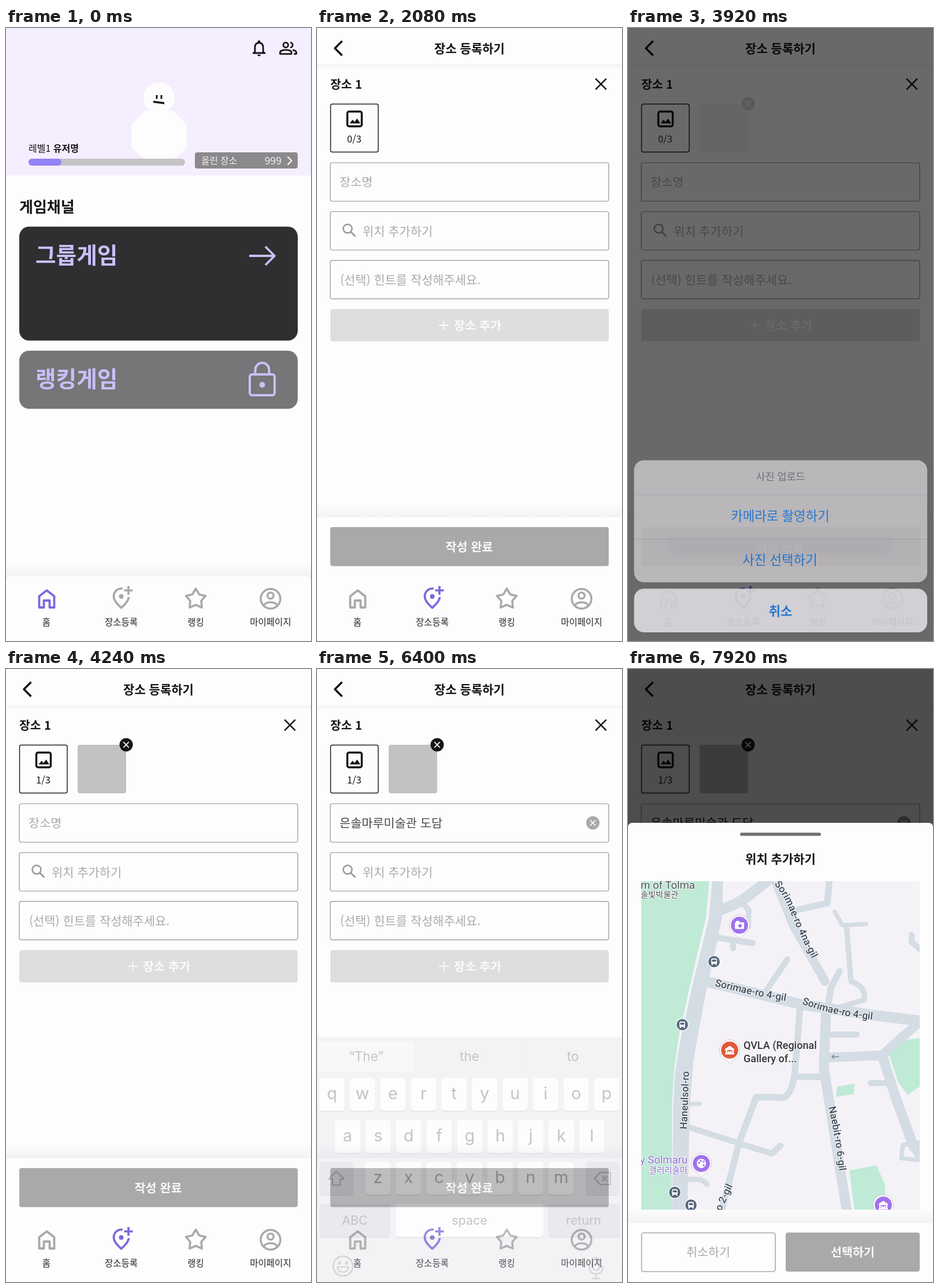
Recreate the animation shown at these times as an HTML page. Size 528 px wide and 1060 px high, loop 8000 ms.

```html
<!DOCTYPE html>
<html lang="ko">
<head>
<meta charset="utf-8">
<title>장소 등록</title>
<style>
html, body { margin: 0; width: 100%; height: 100%; overflow: hidden; background: #fdfdfd; }
svg { display: block; width: 528px; height: 1060px; }
text { font-family: "Noto Sans CJK KR", "Noto Sans KR", "Noto Sans CJK", "Noto Sans", sans-serif; white-space: pre; }
.kb text { font-family: Inter, Roboto, sans-serif; }
.map text { font-family: Roboto, "Noto Sans CJK KR", "Noto Sans CJK", sans-serif; paint-order: stroke; stroke: #fafafa; stroke-width: 2px; stroke-linejoin: round; }
</style>
</head>
<body>
<svg id="stage" viewBox="0 0 528 1060" xmlns="http://www.w3.org/2000/svg"></svg>
<script>
const INK = '#151417', PAPER = '#fdfdfd', GRAY = '#a9a8aa', VIOLET = '#7b68dc', LILAC = '#c9bff8', BLUE = '#1f7ae6';

// y is the optical middle of the line
const text = (s, x, y, size, fill = INK, weight = 400, anchor = 'start') =>
  `<text x="${x}" y="${y + size * 0.375}" font-size="${size}" fill="${fill}" font-weight="${weight}" text-anchor="${anchor}">${s}</text>`;
const mid = (s, x, y, size, fill, weight) => text(s, x, y, size, fill, weight, 'middle');
const box = (x, y, x2, y2, r, fill, extra = '') =>
  `<rect x="${x}" y="${y}" width="${x2 - x}" height="${y2 - y}" rx="${r}" fill="${fill}" ${extra}/>`;
const line = (d, color, width, extra = '') =>
  `<path d="${d}" fill="none" stroke="${color}" stroke-width="${width}" stroke-linejoin="round" ${extra}/>`;
const dot = (x, y, r, fill, extra = '') => `<circle cx="${x}" cy="${y}" r="${r}" fill="${fill}" ${extra}/>`;
const ring = (x, y, r, color, width) => dot(x, y, r, 'none', `stroke="${color}" stroke-width="${width}"`);
const shape = (d, fill) => `<path d="${d}" fill="${fill}"/>`;
const cross = (x, y, h, color, width) =>
  line(`M${x - h} ${y - h}l${2 * h} ${2 * h}M${x + h} ${y - h}l${-2 * h} ${2 * h}`, color, width);
const layer = (id, body, cls = '') => `<g id="${id}" class="${cls}">${body}</g>`;
const badge = (x, y, fill) => dot(x, y, 11.5, fill) + cross(x, y, 4.8, '#f4f4f4', 1.8);

function star(cx, cy, R, r) {
  const pts = [];
  for (let i = 0; i < 10; i++) {
    const a = -Math.PI / 2 + i * Math.PI / 5, q = i % 2 ? r : R;
    pts.push((cx + q * Math.cos(a)).toFixed(1) + ' ' + (cy + q * Math.sin(a)).toFixed(1));
  }
  return 'M' + pts.join('L') + 'Z';
}

function nav(active) {
  const tint = i => i === active ? VIOLET : GRAY;
  const label = (s, x) => mid(s, x, 1027, 15.5, '#242326');
  return line('M57.5 982.5L70.5 972.5L83.5 982.5V1002H75.5V990H65.5V1002H57.5Z', tint(0), 3.8) +
    line('M202 969.5C194 968 186.5 974 186.5 983C186.5 990 192 996 199.5 1002.5C207 996 212.5 990 212.5 984', tint(1), 3.7) +
    dot(199.5, 983, 4, tint(1)) + line('M212 965v15M204.5 972.5h15', tint(1), 3.7) +
    line(star(328.5, 987.5, 18, 10), tint(2), 3.6) +
    ring(458, 987, 17, tint(3), 3.5) + ring(458, 981.5, 5.3, tint(3), 3.5) +
    line('M446 999Q449 993 458 993T470 999', tint(3), 3.5) +
    label('홈', 70) + label('장소등록', 199.5) + label('랭킹', 328.5) + label('마이페이지', 458);
}

const footer = (y, r) => box(0, y - 24, 528, y + 8, 0, 'url(#up)') + box(0, y, 528, 1080, r, PAPER);

const home = box(0, 0, 528, 1060, 0, PAPER) + box(0, 0, 528, 255, 0, '#f4eeff') +
  `<g transform="translate(421 17.7) scale(1.42)">${shape('M12 22c1.1 0 2-.9 2-2h-4c0 1.1.9 2 2 2zm6-6v-5c0-3.07-1.63-5.64-4.5-6.32V4c0-.83-.67-1.5-1.5-1.5s-1.5.67-1.5 1.5v.68C7.64 5.36 6 7.92 6 11v5l-2 2v1h16v-1l-2-2zm-2 1H8v-6c0-2.48 1.51-4.5 4-4.5s4 2.02 4 4.5v6z', INK)}</g>` +
  `<g transform="translate(471.7 18.2) scale(1.4)">${ring(9, 8, 3, INK, 2) +
    line('M2 19v-2c0-2 4-3 7-3s7 1 7 3v2zM14.5 5a3 3 0 0 1 0 6M17.5 14c2.5.6 4.5 1.5 4.5 3v2h-3', INK, 2)}</g>` +
  dot(265, 121, 27, PAPER) +
  shape('M241 143H289L301 155L313 168V206L300 219L289 226H241L230 219L217 206V168L229 155Z', PAPER) +
  line('M261 116v6.5M269 116v6.5', INK, 3) + line('M255 127.5L274 130', INK, 3.6) +
  text('레벨1 <tspan font-weight="700">유저명</tspan>', 39, 208, 16, INK, 500) +
  box(39, 226, 310, 238, 6, '#c4c3c5') + box(39, 226, 96, 238, 6, '#9183f6') +
  box(327, 215, 505, 243, 4, '#8b898c') + text('올린 장소', 338, 229, 15.7, '#f1f0f2', 300) +
  text('999', 477, 229.5, 17.5, '#f1f0f2', 300, 'end') + line('M487.5 222.5L494.5 229.5L487.5 236.5', '#fff', 2.2) +
  text('게임채널', 23, 309.5, 26, INK, 700) +
  box(23, 343.5, 505, 540.5, 17, '#2f2f31') + text('그룹게임', 51, 392, 38.7, LILAC, 700) +
  line('M421 394H464M449 378L465 394L449 410', LILAC, 3.8, 'stroke-linejoin="miter"') +
  box(23, 558, 505, 658.5, 17, '#767577') + text('랭킹게임', 51, 606, 38.7, LILAC, 700) +
  box(422, 599, 465, 635, 4, 'none', `stroke="${LILAC}" stroke-width="4"`) +
  line('M431.5 599V591A12 12 0 0 1 455.5 591V599', LILAC, 4) + dot(443.5, 617, 5, LILAC) +
  footer(948, 8) + nav(0);

const field = y => box(23, y, 505, y + 66.5, 3.5, PAPER, 'stroke="#929194" stroke-width="1.2"');
const HINT = '#aaa9ac';
const register = box(0, 0, 528, 1060, 0, PAPER) + box(0, 63, 528, 71, 0, 'url(#down)') +
  line('M43.5 22.5L31 35L43.5 47.5', INK, 3.6) +
  mid('장소 등록하기', 264, 35.5, 21, INK, 700) +
  text('장소 1', 23, 97.5, 20.3, INK, 700) + cross(491.5, 97, 9.3, INK, 2.5) +
  box(23.5, 131.5, 106, 214.5, 3, PAPER, 'stroke="#222" stroke-width="1.5"') +
  box(52.5, 144.5, 77.5, 170, 3, 'none', `stroke="${INK}" stroke-width="3.5"`) +
  shape('M56.5 165l5-6.5 3.5 4 4.5-6 5.5 8.5z', INK) +
  layer('zero', mid('0/3', 64.5, 192, 16.5, INK)) + layer('one', mid('1/3', 64.5, 192, 16.5, INK)) +
  layer('photo', box(124, 131, 208, 215, 4, '#c3c2c3') + badge(208, 131, INK)) +
  field(233) + layer('empty', text('장소명', 39, 266, 20.8, HINT, 350)) +
  layer('typed', text('은솔마루미술관 도담', 39, 266, 20.8, INK, 400) + badge(477.5, 266, '#8f8e91')) +
  field(317.5) + ring(53, 347, 7.5, '#99989b', 2.5) + line('M58.5 352.5L66.5 360.5', '#99989b', 2.8) +
  text('위치 추가하기', 79, 351, 20.9, HINT, 350) +
  field(401.8) + text('(선택) 힌트를 작성해주세요.', 40, 435, 20.9, HINT, 350) +
  box(23, 486, 505, 542, 4, '#e0dde1') + line('M211 514h17M219.5 505.5v17', '#fbfafb', 2) +
  text('장소 추가', 237, 514, 20.8, '#fbfafb', 700) +
  footer(846, 0) + box(23, 863, 505, 930.5, 4, GRAY) + mid('작성 완료', 263.5, 897, 20.7, '#fafafa', 700) + nav(1);

const actions = box(10.5, 747.5, 518, 958.5, 17, '#c9c7ca') +
  box(65, 882, 463, 908, 13, '#606070', 'opacity=".07" filter="url(#soft)"') +
  line('M11 807H518M11 884H518', '#b0aeb2', 1) +
  mid('사진 업로드', 264, 775, 17.4, '#737175', 500) +
  mid('카메라로 촬영하기', 263.5, 844, 22.3, BLUE) + mid('사진 선택하기', 263, 920, 22.3, BLUE) +
  box(10.5, 969.5, 518, 1045, 17, '#e7e5e9') + mid('취소', 264, 1008, 22, BLUE, 700);

function keyboard() {
  const key = (x, x2, y, fill = '#fdfdfd') => box(x, y + 2, x2, y + 58.5, 6, '#8b8d92') + box(x, y, x2, y + 57, 6, fill);
  const label = (s, x, y, size) => `<text x="${x}" y="${y}" font-size="${size}" fill="${INK}" text-anchor="middle">${s}</text>`;
  const row = (s, x, y) => [...s].map((c, i) => {
    const cx = x + i * 52.85;
    return key(cx - 22, cx + 22, y) + label(c, cx, y + 36.5, 29);
  }).join('');
  const DARK = '#abb1bf', ICON = '#55575d';
  return box(0, 636, 528, 1060, 0, '#d3d6de') + box(2, 644, 168, 696, 5, '#ecebf1') +
    label('“The”', 85, 678, 22.5) + label('the', 264, 678, 22.5) + label('to', 443, 678, 22.5) +
    line('M354 653V688', '#b6bac3', 1.2) +
    row('qwertyuiop', 25.8, 707) + row('asdfghjkl', 53, 780) + row('zxcvbnm', 105.5, 852) +
    key(4, 63, 852, DARK) + line('M33.5 868.5L47 882H40V892.5H27V882H20Z', INK, 2) +
    key(465, 523.5, 852, DARK) + line('M480.5 881L490 870.5H508V891.5H490Z', INK, 2) + cross(498, 881, 4.5, INK, 2) +
    key(4, 127, 925, DARK) + key(136.5, 392, 925) + key(400.5, 524, 925, DARK) +
    label('ABC', 65.5, 960.5, 21.5) + label('space', 264, 960.5, 21.5) + label('return', 461.5, 960.5, 21.5) +
    ring(45, 1032.5, 17, ICON, 2.5) + dot(39, 1027, 2.6, ICON) + dot(51, 1027, 2.6, ICON) +
    line('M35 1034H55C54 1040 50 1043 45 1043S36 1040 35 1034Z', ICON, 2.2) +
    box(477.5, 1018, 488.5, 1040, 5.5, 'none', `stroke="${ICON}" stroke-width="2.3"`) +
    line('M471.5 1032v3c0 15 23 15 23 0v-3M483 1046v8M476 1054h14', ICON, 2.3);
}

function map() {
  const GREEN = '#bfead6', ROAD = '#d4dde4', LABEL = '#3f4a5b', PURPLE = '#9f72ea', PLUM = '#8a6fd0';
  const roads = [
    [17, 'M152 419Q190 408 215 387L252 358'],
    [8, 'M196 402L209 417L208 446'], [9, 'M157 465L216 474M182 472v11'],
    [14, 'M252 358L286 443L341 540'], [10, 'M295 416L345 405L349 360M366 523L351 552L346 585'],
    [9, 'M276 502L240 555M348 632H396M420 716H445M505 484L491 472V460'],
    [6, 'M358 420L371 443L412 441M108 752H124M505 819L476 823L473 846L505 849'],
    [8, 'M378 443L386 540Q413 550 409 572L345 592M103 883Q130 880 137 891'],
    [17, 'M130 539L230 563L300 580L420 598L510 609'],
    [15, 'M440 668Q470 640 510 606M344 672L440 668'],
    [10, 'M298 585L289 695Q284 738 268 741L222 740L192 820L160 945M289 705H336'],
    [16, 'M343 588L339 690L380 945M440 668L463 740L494 825L512 848'],
    [9, 'M107 793L249 838L264 824']
  ];
  const pave = (grow, color) => roads.map(([w, d]) => line(d, color, w + grow, 'stroke-linecap="round"')).join('');
  const along = (id, d, s) => `<path id="${id}" d="${d}" fill="none"/><text font-size="17.5" fill="${LABEL}" font-weight="500"><textPath href="#${id}">${s}</textPath></text>`;
  const avenue = 'M147 360L141 430L113 545L92 640L82 700L79 760L77 945H102L106 760L112 680L119 640L134 560L147 500L162 430L164 360Z';
  const pin = (x, y, color, icon) =>
    `<path d="M${x - 12.5} ${y + 12}A17.5 17.5 0 1 1 ${x + 12.5} ${y + 12}L${x} ${y + 23}Z" fill="#fff" stroke="#c9c6cf"/>` +
    dot(x, y, 14.8, color) + `<g transform="translate(${x} ${y})">${icon}</g>`;
  const museum = shape('M-8 -2L0 -7.5L8 -2V0H-8ZM-7 0h2.5v6h-2.5zM4.5 0h2.5v6h-2.5zM-8 5H8V7.5H-8zM-3.5 5V1L0 3L3.5 1V5Z', '#fff');
  const camera = box(-8, -5, 8, 6.5, 1.5, '#fff') + box(-6, -7.5, 0, -4, 1, '#fff') + dot(1, 1, 3, PURPLE);
  const palette = dot(0, 0, 8, '#fff') + [[-4, -1], [-1, -4.5], [4, -3], [4, 3]].map(p => dot(p[0], p[1], 1.7, PURPLE)).join('');
  const stop = (x, y) => dot(x, y, 11, '#fff') + dot(x, y, 9.8, '#56677d') + box(x - 5, y - 5.5, x + 5, y + 4, 2, '#fff') +
    box(x - 3.5, y - 3.5, x + 3.5, y, 0.5, '#56677d') + line(`M${x - 3.5} ${y + 4}v2M${x + 3.5} ${y + 4}v2`, '#fff', 2);
  return box(23, 367, 505, 935, 0, '#f5f2f7') +
    shape('M23 367H141L135 430L109 540L88 635L79 700L76 760V935H23Z', GREEN) +
    shape('M450 660L480 642L505 638V722L484 736L468 716ZM362 722L392 717L391 735L360 740ZM383 867L430 858L445 892V935H392Z', GREEN) +
    line(avenue, '#c8d3dc', 1.2) + pave(1, '#c8d3dc') + shape(avenue, ROAD) + pave(0, ROAD) +
    stop(149, 506) + stop(94, 615) + stop(81, 905) + stop(109, 927) +
    line('M353 670.5h12M357 667l-4 3.5 4 3.5', '#7c8792', 1.6) +
    text('m of Tolma', 22, 373.5, 18.6, '#4c5156') + text('솔빛박물관', 22, 390, 14.2, '#4c5156') +
    along('r1', 'M253 372Q270 392 281 420Q300 468 330 522', 'Sorimae-ro 4na-gil') +
    along('r2', 'M150 548Q215 565 300 579', 'Sorimae-ro 4-gil') +
    along('r3', 'M301 579Q360 602 450 609', 'Sorimae-ro 4-gil') +
    along('r4', 'M102 796L107 660', 'Haneulsol-ro') +
    along('r5', 'M347 758Q360 810 368 890', 'Naebit-ro 6-gil') +
    along('r6', 'M161 938L190 875', 'o 2-gil') +
    text('QVLA (Regional', 200, 650.5, 18, '#33363b', 500) + text('Gallery of...', 200, 673, 18, '#33363b', 500) +
    text('y Solmaru', 103, 848.5, 18.5, PLUM, 400, 'end') + text('갤러리솔마', 103, 867, 14.5, PLUM, 400, 'end') +
    pin(193, 443, PURPLE, camera) + pin(176, 659, '#e2573b', museum) + pin(127, 855, PURPLE, palette) + pin(442, 927, PURPLE, museum);
}

const sheet = shape('M0 1060V274Q0 266 8 266H520Q528 266 528 274V1060Z', PAPER) +
  box(194, 283, 334, 288.5, 2.5, '#737175') + mid('위치 추가하기', 264, 328, 21, INK, 700) +
  `<g clip-path="url(#frame)" class="map">${map()}</g>` +
  footer(958, 0) + box(23.5, 975, 255, 1042, 4, PAPER, `stroke="${GRAY}" stroke-width="1.6"`) +
  mid('취소하기', 139, 1008, 20.7, GRAY, 500) +
  box(273, 974.5, 505, 1042, 4, GRAY) + mid('선택하기', 389, 1008, 20.7, '#fafafa', 700);

const fade = (id, y1, y2) => `<linearGradient id="${id}" x1="0" x2="0" y1="${y1}" y2="${y2}"><stop offset="0" stop-color="#6a4f80" stop-opacity=".07"/><stop offset="1" stop-color="#6a4f80" stop-opacity="0"/></linearGradient>`;
const shade = box(0, 0, 528, 1060, 0, '#030204', 'opacity=".7"');

document.getElementById('stage').innerHTML =
  `<defs>${fade('up', 0.75, 0)}${fade('down', 0, 1)}<filter id="soft" x="-20%" y="-150%" width="140%" height="400%"><feGaussianBlur stdDeviation="9"/></filter>` +
  `<clipPath id="frame">${box(23, 367, 505, 935, 0, '#000')}</clipPath></defs>` +
  layer('home', home) + layer('register', register) + layer('keys', keyboard(), 'kb') +
  layer('dim', shade) + layer('actions', actions) + layer('sheet', sheet);

// damped spring: stiffness 100, damping 15, mass 1
function spring(ms) {
  if (ms <= 0) return 0;
  const s = ms / 1000, w = 6.614;
  return Math.min(1, 1 - Math.exp(-7.5 * s) * (Math.cos(w * s) + 7.5 / w * Math.sin(w * s)));
}

const LOOP = 8000, STEP = 80;
const set = (id, v) => document.getElementById(id).setAttribute('opacity', v.toFixed(3));

function draw(t) {
  const at = start => spring(t - start);
  const menu = at(2640), picked = at(3852), typed = at(6180), located = at(6986);
  const menuOn = menu * (1 - picked);
  set('register', at(1385));
  set('zero', 1 - picked);
  set('one', picked);
  set('photo', picked);
  set('keys', at(5315) * (1 - typed));
  set('empty', 1 - typed);
  set('typed', typed);
  set('actions', menuOn);
  set('sheet', located);
  set('dim', Math.max(menuOn, located));
}

function tick() {
  draw(Math.floor(performance.now() % LOOP / STEP) * STEP);
  requestAnimationFrame(tick);
}
tick();
</script>
</body>
</html>
```
